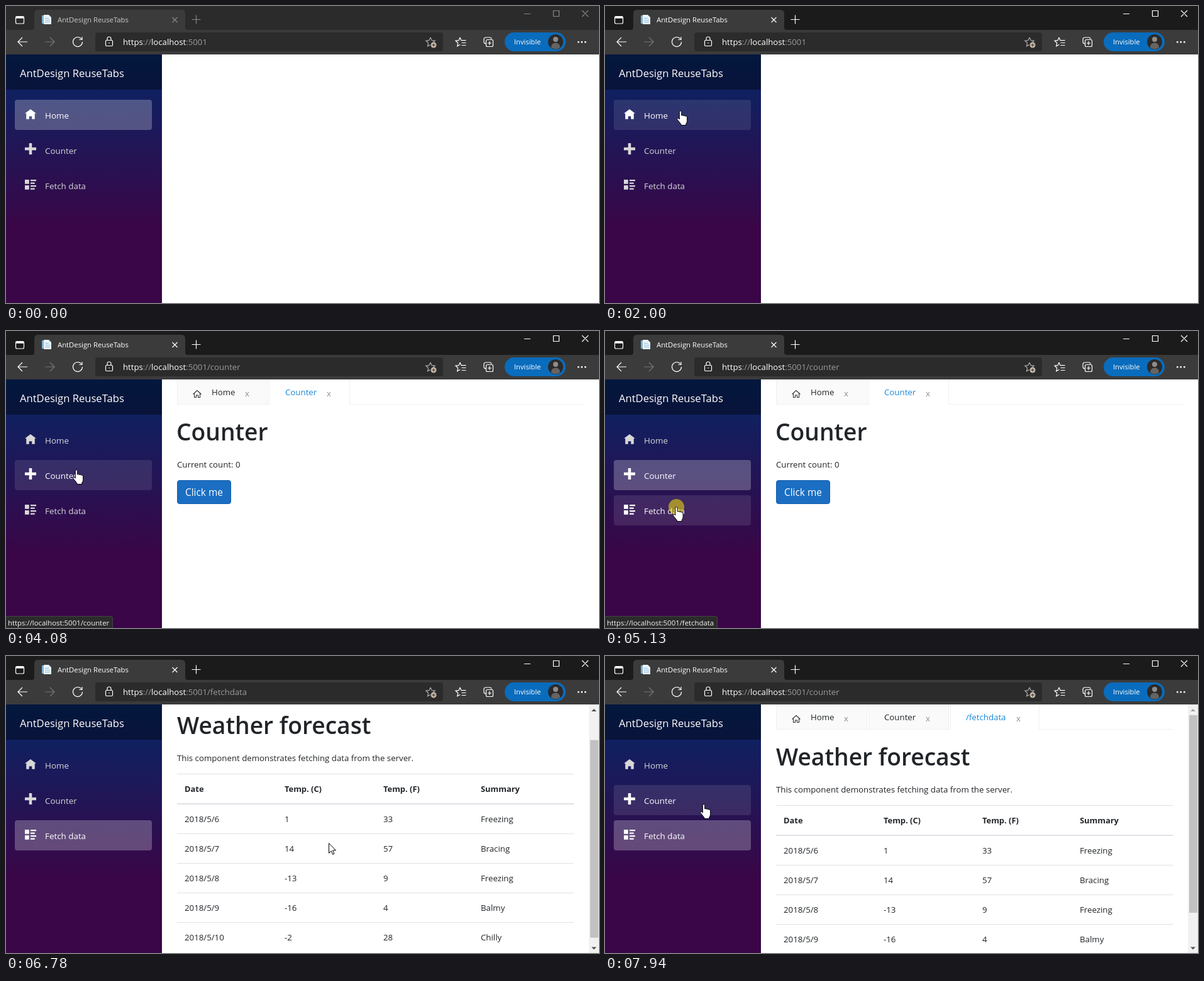
An HTML page for the animation above (8 s loop, 943 by 472 pixels).

```html
<!DOCTYPE html>
<html lang="en">
<head>
<meta charset="utf-8">
<title>AntDesign ReuseTabs</title>
<style>
  html, body { margin: 0; width: 100%; height: 100%; overflow: hidden; background: #fff; }
  svg { display: block; width: 100%; height: 100%; }
  text { font: 13.25px "Open Sans", "Noto Sans", sans-serif; white-space: pre; }
  .line { fill: none; stroke: #fff; stroke-width: 1.2; }
  .win { stroke: #fff; }
  .idle .win { stroke: #878787; }
  .title { font-size: 11.3px; fill: #fff; }
  .idle .title { fill: #c9c9c9; }
  .bar { fill: #1b1b1b; }
  .idle .bar { fill: #2b2b2b; }
  .url { font-size: 13.2px; fill: #9a9a9a; }
  .url .lit { fill: #fff; }
  .nav { fill: #d7d7d7; }
  .nav.on { fill: #fff; }
  .nav text { font-size: 13.4px; font-weight: 500; }
  .page { fill: #212529; }
  .big { font-size: 37.2px; font-weight: 600; }
  .head { font-size: 12.9px; font-weight: 700; }
</style>
</head>
<body>
<svg id="stage" viewBox="0 0 943 472">
  <defs>
    <linearGradient id="night" x2="0" y2="1">
      <stop stop-color="#052767"/><stop offset=".7" stop-color="#3a0647"/>
    </linearGradient>
    <clipPath id="view"><rect x="248" y="77" width="695" height="395"/></clipPath>
  </defs>
  <rect width="943" height="472" fill="#fff"/>

  <g clip-path="url(#view)">
    <g id="scroll" class="page">
      <g id="tabs"></g>
      <g id="counter">
        <text class="big" x="271" y="174">Counter</text>
        <text x="272" y="217">Current count: 0</text>
        <rect x="272.5" y="237.5" width="85" height="37" rx="3.5" fill="#1b6ec2" stroke="#1861ac"/>
        <text x="285" y="262" fill="#fff" style="font-size:15.4px">Click me</text>
      </g>
      <g id="weather">
        <text class="big" x="272" y="174">Weather forecast</text>
        <text x="272" y="217">This component demonstrates fetching data from the server.</text>
        <rect x="272" y="284" width="631" height="2" fill="#dee2e6"/>
      </g>
    </g>
    <g id="scrollbar">
      <rect x="927" y="77" width="16" height="395" fill="#f1f1f1"/>
      <path id="up" d="M931 88l4-4 4 4z"/>
      <path d="M931 462.500l4 4 4-4z" fill="#505050"/>
      <rect id="thumb" x="929" y="94" width="13" height="314" fill="#c1c1c1"/>
    </g>
  </g>

  <rect y="77" width="248" height="395" fill="url(#night)"/>
  <rect y="77" width="248" height="56" fill-opacity=".4"/>
  <text x="22" y="113" fill="#fff" style="font-size:16.6px">AntDesign ReuseTabs</text>
  <g id="menu"></g>

  <g id="status">
    <path id="statusBox" fill="#2b2b2b" stroke="#444"/>
    <text id="statusText" x="3" y="468" fill="#f4f4f4" style="font-size:11.4px"></text>
  </g>

  <g id="browser">
    <rect class="bar" width="943" height="38"/>
    <rect y="38" width="943" height="39" fill="#3b3b3b"/>
    <path d="M41 38q4 0 4-4V12q0-6 6-6h228q6 0 6 6v22q0 4 4 4z" fill="#3b3b3b"/>
    <rect x="142" y="42" width="553" height="30" rx="4" fill="#2b2b2b"/>
    <g class="line">
      <rect x="15.5" y="16.5" width="13" height="11.500" rx="2"/>
      <path d="M16 18.200h12" stroke-width="3"/>
      <path class="win" d="M264.500 18l8 8m0-8l-8 8M295.500 21.500h14m-7-7v14"/>
      <path class="win" d="M824 12.500h10M870.500 7.500h9v9h-9zM916 7l10 10m0-10l-10 10"/>
      <path d="M34 57H19m7-7l-7 7 7 7"/>
      <path d="M62 57h15m-7-7l7 7-7 7" stroke="#777"/>
      <path d="M120 52.500a7.500 7.500 0 1 0 1.500 4.500M121 49v4.500h-4.500"/>
      <rect x="158.500" y="54.500" width="11" height="9" rx="1.500"/>
      <path d="M161 54v-2a3 3 0 0 1 6 0v2M164 58v1.500"/>
      <path d="M675 50l2.200 4.700 5 .6-3.700 3.500M675 50l-2.200 4.700-5 .6 3.700 3.500-1 5 4-2.200" stroke="#aaa"/>
      <path d="M722 50l2 4.700h7.500M722 50l-2 4.700-5 .6 3.700 3.500-1 5 4.600-2.500M724.500 58.500h7M724.500 62.500h7"/>
      <path d="M763 60q-3-.5-3-3v-4q0-3 3-3h6q3 0 3 2.500"/>
      <rect x="763.500" y="53.500" width="11" height="11" rx="2"/>
      <path d="M769 56v6m-3-3h6"/>
    </g>
    <circle cx="680" cy="62" r="4.500" fill="#c9b9a8"/>
    <path d="M680 59.500v5m-2.500-2.500h5" stroke="#2b2b2b"/>
    <rect x="793" y="42" width="97" height="30" rx="15" fill="#0a6cbd"/>
    <text x="808" y="61" fill="#fff" style="font-size:11.2px">Invisible</text>
    <circle cx="874" cy="57" r="12" fill="#2c2a29"/>
    <circle cx="874" cy="53" r="4" fill="#8f8d8c"/>
    <path d="M867 66q0-7.500 7-7.500t7 7.500q-7 5-14 0z" fill="#666463"/>
    <path d="M909 56h2.500v2.500H909zm5.500 0h2.500v2.500h-2.500zm5.500 0h2.500v2.500H920z" fill="#fff"/>
    <path d="M57 15h9v13h-9z" fill="#7fb2d0"/>
    <path d="M60 14h8l4 4v11H60z" fill="#e9f4fa"/>
    <path d="M62 19.500h6m-6 3h8m-8 3h8" stroke="#8fbdd6"/>
    <text class="title" x="82" y="26">AntDesign ReuseTabs</text>
    <text class="url" x="186" y="62"><tspan class="lit">https</tspan>://<tspan class="lit">localhost</tspan>:5001<tspan id="path"></tspan></text>
  </g>

  <g id="cursor">
    <circle id="click" r="12.500" fill="#ffee00" fill-opacity=".52"/>
    <g fill="#fff" stroke="#000" stroke-linejoin="round">
      <path id="arrow" d="M.5 .7V16.300L4.200 12.800 6.500 18.300 8.900 17.300 6.600 11.900H11.500Z"/>
      <path id="hand" d="M-1.700 13.500V1.900a1.700 1.700 0 0 1 3.400 0V7.500q1.700-1 3.300.4 1.700-.7 3 .6 2.300-.4 2.600 1.700V16q0 3-2 5v2H1v-1.500L-4.600 14.500q-1.600-2 .2-2.800 1.200-.3 2.700 1.800Z"/>
    </g>
  </g>
</svg>

<script>
const $ = id => document.getElementById(id);
const set = (el, attrs) => { for (const k in attrs) el.setAttribute(k, attrs[k]); };
const add = (parent, html) => {
  parent.insertAdjacentHTML('beforeend', html);
  return parent.lastElementChild;
};
const show = (el, on) => el.setAttribute('visibility', on ? 'inherit' : 'hidden');

const LOOP = 8000, MAX_SCROLL = 59;

// Sidebar entries
const ICONS = [
  'M4 0l-4 3h1v4h2v-2h2v2h2v-4.030l1 .03-4-3z',
  'M3 0v3h-3v2h3v3h2v-3h3v-2h-3v-3h-2z',
  'M0 0v3h3v-3zM4 0v1h4v-1zM4 2v1h3v-1zM0 4v3h3v-3zM4 4v1h4v-1zM4 6v1h3v-1z'
];
const ICON_Y = [164, 218, 276];
const navs = ['Home', 'Counter', 'Fetch data'].map((label, i) => add($('menu'),
  `<g class="nav"><rect x="14" y="${149 + 56 * i}" width="218" height="48" rx="4" fill="#fff"/>
   <path d="${ICONS[i]}" transform="translate(30 ${ICON_Y[i]}) scale(2.25)"/>
   <text x="62" y="${179 + 56 * i}">${label}</text></g>`));

// Tab strip: left, right, label x, close x, label
const strip = add($('tabs'), '<rect x="272" y="116" height="1" fill="#f0f0f0"/>');
const tabs = [
  [272, 417, 327, 380, 'Home'],
  [419, 547, 444, 510, 'Counter'],
  [549, 691, 574, 654, '/fetchdata']
].map(([l, r, x, close, label]) => add($('tabs'),
  `<g><path d="M${l + .5} 117V77M${r - .5} 77V117" stroke="#f0f0f0"/>
   <rect x="${l + 1}" y="77" width="${r - l - 2}"/>
   <text x="${x}" y="102">${label}</text>
   <text x="${close}" y="104" fill="#8c8c9c">x</text></g>`));
add(tabs[0], '<path d="M297.500 100.500l6.500-6 6.500 6M299.500 99.500v6h3v-3.500h3v3.500h3v-6" fill="none" stroke="#333" stroke-width="1.100"/>');

// Weather table
const rows = [
  ['Date', 'Temp. (C)', 'Temp. (F)', 'Summary'],
  ['2018/5/6', 1, 33, 'Freezing'],
  ['2018/5/7', 14, 57, 'Bracing'],
  ['2018/5/8', -13, 9, 'Freezing'],
  ['2018/5/9', -16, 4, 'Balmy'],
  ['2018/5/10', -2, 28, 'Chilly']
];
rows.forEach((row, i) => {
  const y = i ? 267 + 47 * i : 266;
  if (i != 1) add($('weather'), `<rect x="272" y="${i ? 238 + 47 * i : 237}" width="631" height="1" fill="#dee2e6"/>`);
  row.forEach((cell, j) => add($('weather'),
    `<text class="${i ? '' : 'head'}" x="${[284, 443, 600, 755][j]}" y="${y}">${cell}</text>`));
});

// Pointer path: time, x, y
const PATH = [
  [460, 840, 466], [1210, 119, 68], [1290, 119, 68], [1390, 116, 59], [1610, 116, 59],
  [2000, 120, 166.5], [2980, 120, 166.5], [3310, 112, 220.5], [4180, 112, 220.5],
  [4330, 113, 257], [4430, 113, 260], [4660, 113.5, 279.5], [6240, 113.5, 279.5],
  [6380, 417, 294], [6660, 513, 297], [7480, 513, 297], [7800, 157, 235.5], [LOOP, 157, 235.5]
];
const CLICKS = [[1610, 1690], [3540, 3680], [5130, 5200], [7800, 7880]];

const ramp = (t, a, b) => Math.min(1, Math.max(0, (t - a) / (b - a)));
const easeOut = p => 1 - (1 - p) ** 2;

function pointer(t) {
  const i = Math.max(1, PATH.findIndex(k => k[0] > t));
  const [a, x, y] = PATH[i - 1], [b, u, v] = PATH[i];
  const p = easeOut(ramp(t, a, b));
  return [x + (u - x) * p, y + (v - y) * p];
}

// Value of the latest [time, value] step
const step = (t, ...steps) => steps.filter(s => s[0] <= t).pop()[1];

function draw(t) {
  const page = step(t, [0, 0], [3780, 1], [5450, 2]);
  const [x, y] = pointer(t);
  const hover = t >= 460 && x > 14 && x < 232
    ? [0, 1, 2].find(i => y >= 149 + 56 * i && y < 197 + 56 * i) : undefined;

  set($('browser'), { class: t < 1610 ? 'idle' : '' });
  $('path').textContent = step(t, [0, ''], [3680, '/counter'], [5270, '/fetchdata'], [7940, '/counter']);

  navs.forEach((nav, i) => {
    const on = i == hover || i == page;
    set(nav, { class: on ? 'nav on' : 'nav' });
    set(nav.firstElementChild, { 'fill-opacity': i == hover ? .1 : on ? .25 : 0 });
  });

  show($('tabs'), page);
  tabs.forEach((tab, i) => {
    show(tab, page && i <= page);
    const [, face, label] = tab.children;
    const on = i == page;
    set(face, { fill: on ? '#fff' : '#fafafa', height: on ? 40 : 39 });
    set(label, { fill: on ? '#1787d9' : '#212529' });
  });
  set(strip, { width: page == 2 ? 631 : 648 });
  show($('counter'), page == 1);
  show($('weather'), page == 2);
  show($('scrollbar'), page == 2);

  const s = easeOut(ramp(t, 6660, 6860)) - easeOut(ramp(t, 7090, 7240));
  set($('scroll'), { transform: `translate(0 ${-Math.round(s * MAX_SCROLL)})` });
  set($('thumb'), { y: 94 + 47 * s });
  set($('up'), { fill: s > 0 ? '#505050' : '#a3a3a3' });

  const [link, width] = step(t, [0, ['', 0]], [2160, ['', 127]], [3200, ['/counter', 170]],
    [4560, ['/fetchdata', 179]], [6520, ['', 0]]);
  show($('status'), width);
  set($('statusBox'), { d: `M-1 453.5H${width - 3}q2.500 0 2.500 2.500V473H-1z` });
  $('statusText').textContent = 'https://localhost:5001' + link;

  show($('cursor'), t >= 460);
  set($('cursor'), { transform: `translate(${x} ${y})` });
  show($('click'), CLICKS.some(([a, b]) => t >= a && t < b));
  show($('hand'), hover !== undefined);
  show($('arrow'), hover === undefined);
}

function frame() {
  draw(performance.now() % LOOP);
  requestAnimationFrame(frame);
}
frame();
</script>
</body>
</html>
```
